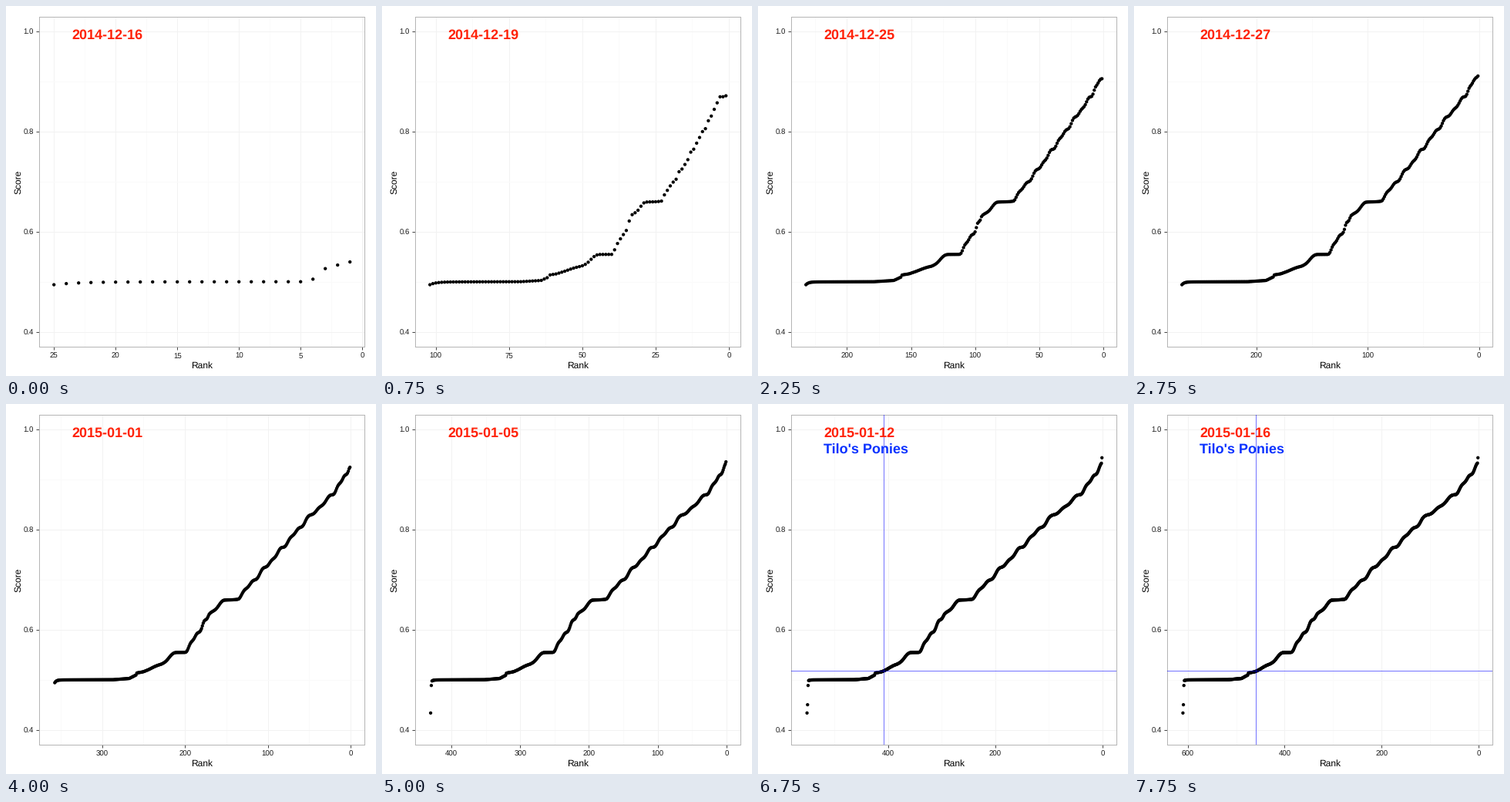
Write a matplotlib script that moves like this. It is 480 by 480 pixels and loops after 8000 ms.

```python
import numpy as np
import matplotlib.pyplot as plt
from matplotlib.animation import FuncAnimation

SIZE, DPI, DAYS = 480, 72, 32
LEFT, TOP, RIGHT, BOTTOM = 43, 13.9, 465.4, 442.4
plt.rcParams.update({"font.family": "Liberation Sans", "text.hinting": "none"})

# Bends of the score curve: score, its rank in a field of 179 and in one of 612.
LEVELS, MID, FULL = np.array([
    (.5005, 138, 517), (.503, 124, 489), (.52, 112, 457), (.532, 98, 431),
    (.5545, 87, 401), (.556, 79, 387), (.605, 69, 352), (.632, 66, 333),
    (.657, 56, 303), (.665, 45, 275), (.73, 30, 209), (.82, 13, 116),
    (.87, 5, 49), (.90, 1, 24), (.93, 0, 2),
]).T
# At the start only four entries have left the common score of 0.5.
START = 1 + 3.2 * np.clip(1 - (LEVELS - .5) / .04, 0, 1) ** .4


def field_size(day):
    return round(np.interp(day, [0, 6, 11, 23, 27, 31], [25, 179, 267, 486, 553, 612]))


def scores(day):
    """Scores in rank order, best first."""
    n = field_size(day)
    early = np.clip((n - 25) / (179 - 25), 0, 1)
    late = np.clip((n - 179) / (612 - 179), 0, 1) ** 1.06
    reach = START + (MID - START) * early + (FULL - MID) * late
    keep = reach > 1
    levels = LEVELS[keep]
    best = max(np.interp(day, [0, 6, 23], [.54, .898, .944]), levels[-1] + .002)

    last = n - day // 12
    rank = np.arange(1, last + 1)
    s = np.interp(rank, np.r_[1, reach[keep][::-1], last], np.r_[best, levels[::-1], .5])

    # Small clumps of similar scores, then the droop at the bottom of the table.
    clumps = sum(np.sin(2 * np.pi * (s - .555) / p) for p in (.021, .035))
    s[1:] -= .0019 * (clumps * (s > .51))[1:]
    s -= .0055 * np.exp((rank - last) / 2)

    stragglers = [.489, .4505, .434] if day >= 25 else [.489, .434] if day >= 20 else []
    if stragglers:
        s[-len(stragglers):] = stragglers
    return s


def axis_step(lo, hi):
    """Tick step and count, scored on simplicity, coverage and density."""
    best = (-9, 1, 1)
    for power in (1, 10, 100):
        for i, q in enumerate((1, 5, 2, 2.5, 4, 3)):
            step = q * power
            for count in range(2, 9):
                end = step * count
                cover = 1 - .5 * ((hi - end) ** 2 + lo ** 2) / (.1 * (hi - lo)) ** 2
                ratio = (max(end, hi) - min(0, lo)) / (4 * step)
                dense = 2 - max(ratio, 1 / ratio)
                value = .25 * (1 - i / 5) + .2 * cover + .5 * dense
                best = max(best, (value, step, count))
    return best[1:]


fig = plt.figure(figsize=(SIZE / DPI, SIZE / DPI), dpi=DPI, facecolor="white")
ax = fig.add_axes([LEFT / SIZE, 1 - BOTTOM / SIZE,
                   (RIGHT - LEFT) / SIZE, (BOTTOM - TOP) / SIZE])
ax.set_axisbelow(True)
ax.grid(which="major", color="#f2f2f2", lw=1)
ax.grid(which="minor", color="#fafafa", lw=1)
ax.tick_params(length=4, width=.9, color="#333333", labelsize=9.6, labelcolor="#1a1a1a")
ax.tick_params(axis="x", pad=3.5)
ax.tick_params(axis="y", pad=3)
ax.tick_params(which="minor", length=0)
for spine in ax.spines.values():
    spine.set(color="#b5b5b5", lw=1)
ax.set_yticks([.4, .6, .8, 1])
ax.set_yticks([.5, .7, .9], minor=True)
ax.set_ylim(.37, 1.03)


def label(x, y, text, **style):
    return fig.text(x / SIZE, 1 - y / SIZE, text, va="baseline", **style)


label(254.5, 470, "Rank", size=12, ha="center")
label(19.6, 228.5, "Score", size=12, ha="center", rotation=90, rotation_mode="anchor")

dots = ax.scatter([], [], color="black", linewidths=0, zorder=3)
guides = [ax.axvline(1, color="blue", lw=1, alpha=.55, zorder=5),
          ax.axhline(.519, color="blue", lw=1, alpha=.55, zorder=5)]
date = label(85.2, 43, "", size=18, weight="bold", color="#ff2208")
team = label(85.2, 64, "Tilo's Ponies", size=18, weight="bold", color="#0a32ff")


def draw(day):
    s = scores(day)
    dots.set_offsets(np.c_[np.arange(1, len(s) + 1), s])
    dots.set_sizes(np.full(len(s), 4.3 ** 2))

    n = field_size(day)
    margin = .05 * (n - 1)
    step, count = axis_step(1 - margin, n + margin)
    ticks = np.arange(count + 1) * step
    ax.set_xticks(ticks, [f"{t:g}" for t in ticks])
    ax.set_xticks(ticks[:-1] + step / 2, minor=True)
    ax.set_xlim(n + margin, 1 - margin)

    date.set_text(f"2014-12-{16 + day}" if day < 16 else f"2015-01-{day - 15:02d}")
    for part in guides + [team]:
        part.set_visible(day >= 24)
    rank = 408.5 + 12.6 * (day - 27)
    guides[0].set_xdata([rank, rank])
    return dots, date, team, *guides


anim = FuncAnimation(fig, draw, frames=DAYS, interval=250, repeat=True, repeat_delay=0)
plt.show()
```
